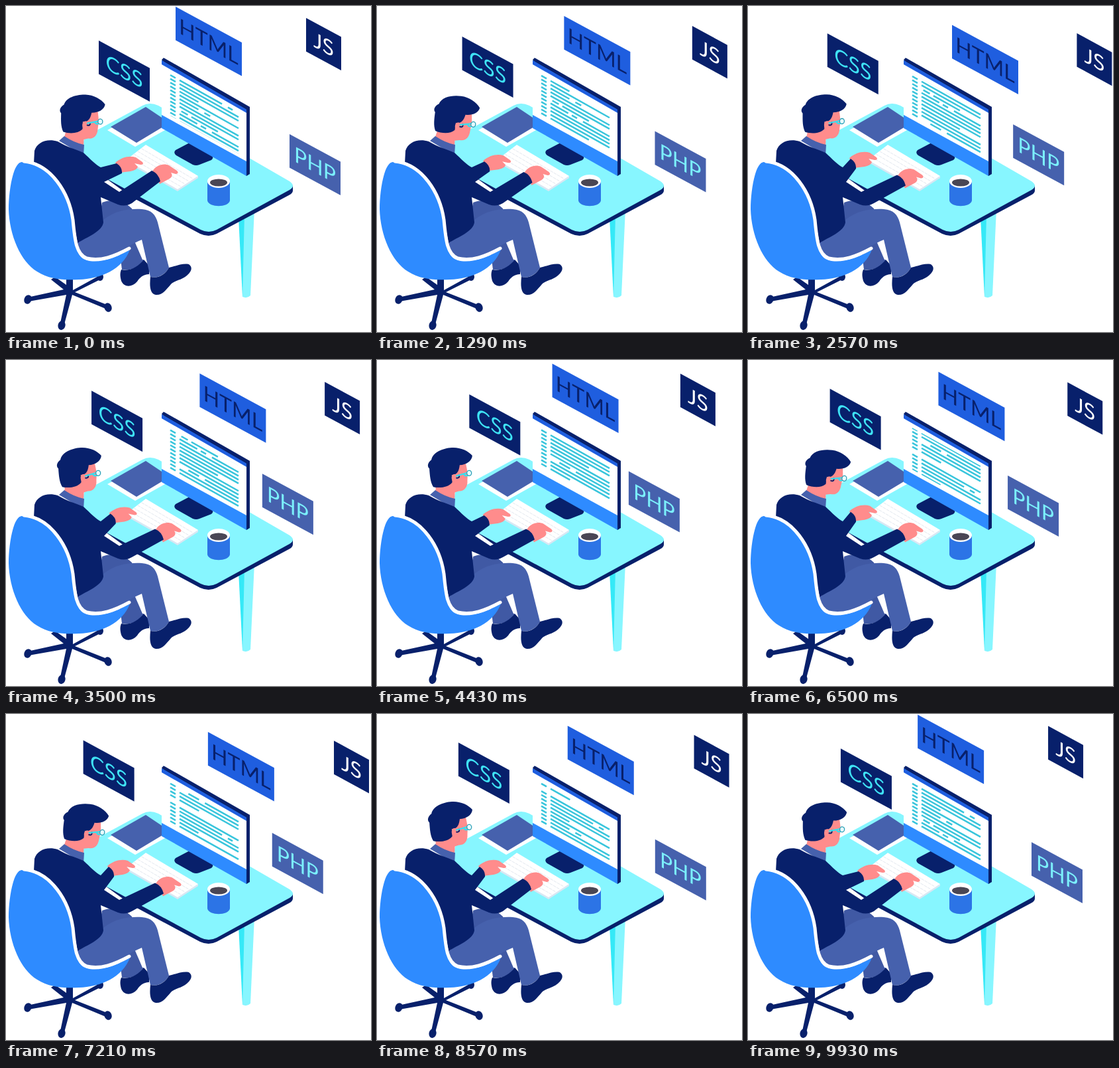
Write an HTML page that moves like this. It is 551 px wide and 491 px high and loops after 10 s.

```html
<!DOCTYPE html>
<html lang="en">
<head>
<meta charset="utf-8">
<title>Developer at a desk</title>
<style>
  html, body { margin: 0; width: 100%; height: 100%; overflow: hidden; background: #fff; }
  svg { display: block; width: 551px; height: 491px; }
  .navy { fill: #08206b; }
  .blue { fill: #2e8bff; }
  .royal { fill: #1f5edf; }
  .slate { fill: #4661ad; }
  .cyan { fill: #87f6ff; }
  .skin { fill: #ff8c8c; }
  .white { fill: #fff; }
  .line { fill: none; stroke-linecap: round; stroke-linejoin: round; }
  text { font: 32px Lato, sans-serif; text-anchor: middle; }
</style>
</head>
<body>
<svg viewBox="0 0 551 491">
  <defs>
    <clipPath id="page"><path d="M246 101L354 161V224L246 164Z"/></clipPath>
  </defs>

  <g id="tags"></g>

  <!-- desk -->
  <path fill="#35e9f7" d="M351 318L362 312L360 438H357Z"/>
  <path class="cyan" d="M360 314L375 306L369 436Q364 441 357 438Z"/>
  <path class="navy" d="M110 230L433 270V278Q433 282 427 285L318 343Q306 349 293 343L190 288Z"/>
  <path class="cyan" d="M118 200Q120 195 130 191L206 150Q217 144 230 150L428 264Q438 271 428 277L318 337Q306 343 294 337L190 281L110 237Z"/>

  <!-- tablet and paper -->
  <path class="white" d="M153 187L205 158L247 183L195 212Z"/>
  <path class="slate" d="M158 182L211 152L247 176L197 206Z"/>

  <!-- monitor -->
  <path class="navy" d="M256 217L277 206L311 225Q314 229 310 232L292 239Q287 241 282 239L257 225Q252 221 256 217Z"/>
  <path class="navy" d="M235 81L238 78L368 152V253L363 256Z"/>
  <path class="blue" d="M235 82L363 156V256L235 184Z"/>
  <path class="royal" d="M235 82L363 156V161L235 88Z"/>
  <path class="white" d="M235 88L363 161V234L235 164Z"/>
  <g clip-path="url(#page)"><path id="code" class="line" style="stroke-linecap:butt" stroke="#38c5dc" stroke-width="2.5"/></g>

  <!-- keyboard -->
  <path fill="#d9e7f3" d="M181 232L259 275L290 256V259L259 279L181 235Z"/>
  <path class="white" d="M211 209L290 256L259 276L181 232Z"/>
  <path class="line" stroke="#e3e8ef" stroke-width="1" stroke-dasharray="4 2" d="M205 215L282 260M199 219L276 264M193 223L270 268M187 228L264 272"/>

  <!-- mug -->
  <path class="royal" d="M304 264V293C306 304 336 304 338 293V264Z" style="fill:#2c74e6"/>
  <ellipse class="white" cx="321" cy="264" rx="17" ry="10"/>
  <ellipse fill="#4a4654" cx="321" cy="266" rx="13" ry="5.5"/>

  <!-- chair base -->
  <g class="navy">
    <path d="M91 408H101V428L141 406L144 411L104 431L155 451L153 457L100 435L87 483L81 482L91 435L34 445L32 439L87 427L68 412L74 408L91 420Z"/>
    <ellipse cx="33" cy="442" rx="5.5" ry="7" transform="rotate(25 33 442)"/>
    <ellipse cx="84" cy="481" rx="5.5" ry="7" transform="rotate(15 84 481)"/>
    <ellipse cx="154" cy="454" rx="5.5" ry="7" transform="rotate(-20 154 454)"/>
    <ellipse cx="142" cy="408" rx="5" ry="6"/>
  </g>

  <!-- legs -->
  <path class="slate" d="M145 296C160 290 178 293 190 305L200 345L209 383C202 394 188 399 175 397L168 340L140 325Z" style="fill:#4059a4"/>
  <path class="navy" d="M174 397C188 400 200 392 208 382L216 391V404C207 404 202 409 198 415C190 424 178 424 174 414C172 407 172 402 174 397Z"/>
  <path class="white" d="M193 352L205 345L211 383L206 382Z"/>
  <path class="slate" d="M106 356L147 322C165 308 185 305 205 306C220 307 226 315 229 326L246 394C240 405 228 411 218 408L205 352C190 358 180 365 165 374C145 384 118 385 108 368Z"/>
  <path class="navy" d="M218 408C229 411 240 405 246 394C256 392 266 387 276 389C283 394 279 401 273 406C265 413 255 413 249 419C241 428 236 436 226 435C216 433 217 418 218 408Z"/>

  <!-- head -->
  <path class="skin" d="M91 188L118 190L117 213L104 209L87 200Z"/>
  <g id="head">
    <path class="skin" d="M112 164L137 156C138 163 139 168 139 174L138 184C138 193 133 200 124 199L112 202L90 200L89 187Z"/>
    <path class="navy" d="M82 162C78 158 81 152 86 149C89 138 104 133 118 133C130 133 142 139 148 147C147 155 138 160 128 160C127 166 125 171 121 173L115 174V185C109 192 96 193 86 190C82 182 82 173 82 162Z"/>
    <ellipse class="skin" cx="119" cy="179" rx="4.5" ry="6"/>
    <path class="line" stroke="#08206b" stroke-width="2" d="M122 179Q127 180 126 175"/>
    <path class="line" stroke="#35dff0" stroke-width="2.2" d="M122 176L140 172M133 174Q135 178 140 176"/>
    <ellipse cx="141.500" cy="173" rx="3.500" ry="4" fill="#e7fbff" stroke="#2a9fb5" stroke-width="1.300"/>
  </g>
  <path class="slate" d="M80 203L88 196Q103 206 118 209L117 225Z"/>

  <!-- body and arms -->
  <path id="left" class="skin" d="M165 236C174 228 186 225 196 228L206 235Q209 239 203 239L194 237L199 242Q198 247 188 249L172 251Z"/>
  <path id="right" class="skin" d="M221 249C226 240 238 236 246 240L258 248Q262 252 256 253L249 251Q253 256 247 260L232 268Z"/>
  <path id="body" class="navy"/>

  <!-- chair shell -->
  <path class="blue" d="M25 235C11 233 4 278 4 306C5 345 22 385 47 400C65 412 88 413 110 412C142 411 176 397 187 367C165 380 140 388 122 383C104 378 104 353 101 326C96 287 72 241 25 235Z"/>
  <path class="line" stroke="#fff" stroke-width="5" d="M27 234C68 238 95 281 101 322C104 354 106 374 122 380C143 385 164 377 186 365"/>
</svg>
<script>
const LOOP = 10000;
const $ = id => document.getElementById(id);

// Cosine easing between [time, value] keys, wrapping round the loop.
function ease(keys, t) {
  const n = keys.length;
  let i = keys.findIndex(k => k[0] > t);
  if (i < 0) i = n;
  const [t0, a] = i ? keys[i - 1] : [keys[n - 1][0] - LOOP, keys[n - 1][1]];
  const [t1, b] = i < n ? keys[i] : [keys[0][0] + LOOP, keys[0][1]];
  return a + (b - a) * (1 - Math.cos(Math.PI * (t - t0) / (t1 - t0))) / 2;
}

const tags = [
  { word: 'CSS', x: 140, y: 52, w: 77, fill: '#08206b', ink: '#3fe3f5', keys: [[0, 0], [2400, -20.5], [4700, 0], [7700, -25]] },
  { word: 'HTML', x: 256, y: 1, w: 100, fill: '#1f5edf', ink: '#08206b', keys: [[0, 0], [2560, 52], [5110, 0], [7530, 51]] },
  { word: 'JS', x: 453, y: 18, w: 53, fill: '#08206b', ink: '#fff', keys: [[0, 0], [2500, 43.5], [4970, 0], [7450, 43]] },
  { word: 'PHP', x: 428, y: 193, w: 77, fill: '#4661ad', ink: '#7beffb', keys: [[0, 0], [4700, -48.5]] }
];
const nod = [[1400, 7.5], [3500, -4], [4500, -4], [5800, 7.5], [7150, 7.5], [8650, -4]];
const leftKeys = [[0, 0], [500, 0], [2300, 1], [3000, 1], [4200, .4], [5600, 1], [8700, 1], [9800, 0]];
const rightKeys = [[0, 0], [700, 0], [2300, 1], [7300, 1], [8500, 0]];
const liftKeys = [[4500, 0], [5790, 1], [7100, 0]];

$('tags').innerHTML = tags.map(g =>
  `<g><path fill="${g.fill}" d="M0 0L${g.w} ${g.w * .54}v50.500L0 50.500Z"/>
   <text fill="${g.ink}" transform="matrix(1 .54 0 1 ${g.w / 2} ${g.w * .27 + 37})">${g.word}</text></g>`).join('');
const tagNodes = [...$('tags').children];

// Rows of code that are not one full line: pairs of start and end.
const ROWS = 22, STEP = 5.65, SLOPE = .56;
const broken = {
  0: [0, .72, .82, .9], 3: [0, .32], 5: [0, .32, .42, .52], 8: [.03, .14, .2, .65],
  9: [0, .3, .36, .45, .55, 1], 13: [0, .65], 16: [.15, .33, .43, 1], 19: [0, .33], 20: []
};
const stroke = (x0, x1, y) => `M${x0} ${y + (x0 - 248) * SLOPE}L${x1} ${y + (x1 - 248) * SLOPE}`;

function codePath(t) {
  const top = t / LOOP * ROWS, first = Math.floor(top) - 1;
  let d = '';
  for (let i = first; i < first + 15; i++) {
    const row = (i + ROWS) % ROWS, y = 104 + (i - top) * STEP;
    const parts = broken[row] || [0, 1];
    if (parts.length) d += stroke(248, 256, y);
    for (let k = 0; k < parts.length; k += 2)
      d += stroke(262 + 89 * parts[k], 262 + 89 * parts[k + 1], y);
  }
  return d;
}

function draw(t) {
  tags.forEach((g, i) => {
    const dx = ease(g.keys, t);
    tagNodes[i].setAttribute('transform', `translate(${g.x + dx} ${g.y + dx * .53})`);
  });
  $('code').setAttribute('d', codePath(t));
  $('head').setAttribute('transform', `rotate(${ease(nod, t)} 102 205)`);

  const l = ease(leftKeys, t), r = ease(rightKeys, t);
  const lx = -12 * l, ly = -7 * l - 3 * ease(liftKeys, t), rx = 5 * r, ry = 6.5 * r;
  $('left').setAttribute('transform', `translate(${lx} ${ly})`);
  $('right').setAttribute('transform', `translate(${rx} ${ry})`);
  $('body').setAttribute('d',
    `M43 218C47 205 62 199 78 204C93 213 106 216 117 221C127 230 136 240 143 243
     L${167 + lx} ${237 + ly}Q${176 + lx} ${243 + ly} ${175 + lx} ${252 + ly}
     L148 265L171 280L${220 + rx} ${248 + ry}Q${230 + rx} ${252 + ry} ${233 + rx} ${264 + ry}
     L190 297Q180 303 169 299L143 288L147 326C145 340 122 348 108 357
     C103 330 98 300 88 278C76 256 60 242 42 237Z`);
}

function frame(now) {
  draw(now % LOOP);
  requestAnimationFrame(frame);
}
draw(0);
requestAnimationFrame(frame);
</script>
</body>
</html>
```
